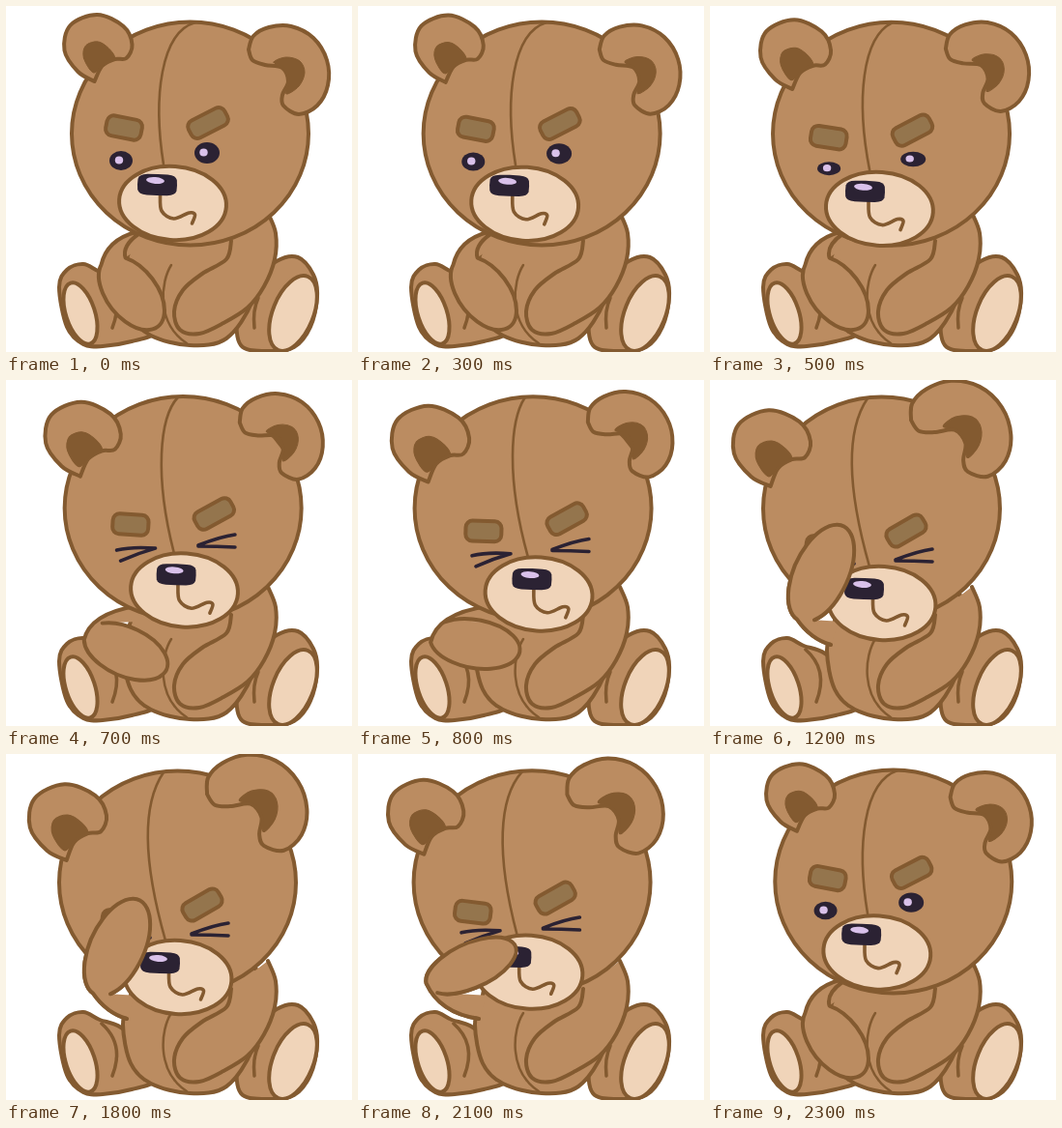
Recreate the animation shown at these times as an HTML page. Size 358 px wide and 358 px high, loop 2.4 s.

```html
<!DOCTYPE html>
<html lang="en">
<head>
<meta charset="utf-8">
<title>Bear facepalm</title>
<style>
  html, body { margin: 0; width: 100%; height: 100%; overflow: hidden; background: #fff; }
  svg { display: block; width: 100vw; height: 100vh; }
</style>
</head>
<body>
<svg id="stage" viewBox="0 0 358 358" stroke-linecap="round" stroke-linejoin="round"></svg>
<script>
const LOOP = 2400, STEP = 100;
const FUR = '#bb8c61', LINE = '#835a30', CREAM = '#f0d4b9', BROW = '#94754d', INK = '#2b2233', SHINE = '#d9c1ea';
const stage = document.getElementById('stage');

const clamp = x => Math.max(0, Math.min(1, x));
const ramp = (t, from, to) => clamp((t - from) / (to - from));
const ease = (t, from, to) => { const x = ramp(t, from, to); return x * x * (3 - 2 * x); };
const mix = (a, b, k) => a.map((v, i) => v + (b[i] - v) * k);

function add(tag, attrs, parent = stage) {
  const el = document.createElementNS('http://www.w3.org/2000/svg', tag);
  set(el, attrs);
  return parent.appendChild(el);
}
function set(el, attrs) {
  for (const k in attrs) el.setAttribute(k, attrs[k]);
}
const place = (el, [x, y], deg = 0, size = 1) =>
  set(el, { transform: `translate(${x} ${y}) rotate(${deg}) scale(${size})` });
const show = (el, on) => set(el, { visibility: on ? 'visible' : 'hidden' });
const path = (d, fill, stroke = LINE, width = 4, parent) =>
  add('path', { d, fill, stroke, 'stroke-width': width }, parent);
const oval = (rx, ry, fill, stroke = 'none') => add('ellipse', { rx, ry, fill, stroke, 'stroke-width': 4 });

// Smooth curve through "x,y x,y ..."
function curve(text, closed) {
  const p = text.split(' ').map(s => s.split(',').map(Number)), n = p.length;
  const get = i => closed ? p[(i + n) % n] : p[Math.max(0, Math.min(n - 1, i))];
  let d = `M${p[0]}`;
  for (let i = 0; i < (closed ? n : n - 1); i++) {
    const [a, b, c, e] = [get(i - 1), get(i), get(i + 1), get(i + 2)];
    d += `C${b.map((v, k) => v + (c[k] - a[k]) / 6)} ${c.map((v, k) => v - (e[k] - b[k]) / 6)} ${c}`;
  }
  return closed ? d + 'Z' : d;
}

// Legs, body and resting arm
path(curve('55,291 63,273 80,267 97,275 119,283 150,310 155,337 130,347 100,352 80,350 63,332', true), FUR);
place(oval(15, 33, CREAM, LINE), [77, 318], -18);
path('M99 279Q123 300 110 333', 'none', LINE, 3.5);
path(curve('240,320 258,285 280,264 302,260 318,278 322,300 315,332 298,353 268,357 243,351', true), FUR);
place(oval(21, 41, CREAM, LINE), [297, 318], 22);
path('M261 302Q255 315 257 333', 'none', LINE, 3.5);
path(curve('139,234 128,253 121,280 129,320 150,341 190,351 228,344 255,305 264,255 258,222 200,210', true), FUR);
path('M171 268C160 285 155 328 187 349', 'none', LINE, 2.5);
path(curve('233,243 228,262 203,277 183,294 174,316 180,335 200,339 225,328 250,312 267,290 278,262 279,235 271,214'), FUR);

// Moving parts, back to front
const sleeve = path('', FUR, 'none'), armBack = path('', 'none');
const head = oval(122.5, 115.5, FUR, LINE);
const seam = path('', 'none', LINE, 2.6);

function ear(outline, hole) {
  const g = add('g', { 'stroke-width': 4 });
  const rim = curve(outline);
  path(rim, FUR, 'none', 0, g);
  path(curve(hole, true), LINE, LINE, 1, g);
  add('path', { d: rim, fill: 'none', stroke: LINE }, g);
  return g;
}
const earL = ear('-4,34 -21,24 -35,2 -29,-24 -1,-35 26,-23 35,-4 29,10 17,11 4,18 -4,34',
  '-15,10 -13,-3 0,-7 12,1 17,11 5,16 -5,25');
const earR = ear('-41,-21 -36,-35 -20,-44 3,-45 26,-33 40,-10 41,16 30,37 11,46 -5,37 -6,26 0,12 -6,-2 -24,-5 -37,-10 -41,-21',
  '-15,-8 -2,-13 12,-9 17,3 11,17 -2,25 0,12 -6,-2');

const brow = (w, h) => add('rect', {
  x: -w / 2, y: -h / 2, width: w, height: h, rx: 7, fill: BROW, stroke: LINE, 'stroke-width': 4
});
const browL = brow(37, 21), browR = brow(42, 20);

function eye(rx, ry, shineX, wink) {
  const ball = oval(rx, ry, INK), shine = oval(4.2, 4, SHINE), lid = path(wink, 'none', INK, 3.6);
  return ([x, y], open) => {
    for (const el of [ball, shine]) show(el, open > 0);
    show(lid, open === 0);
    place(ball, [x, y]);
    place(lid, [x, y]);
    place(shine, [x + shineX, y - .5]);
    set(ball, { ry: ry * open });
    set(shine, { ry: 4 * clamp(open + .2) });
  };
}
const eyeL = eye(12, 10, -2, 'M-20 -4Q-4 -8 20 -6Q2 -1 -16 7');
const eyeR = eye(13, 11, -3.5, 'M19 -7Q4 -5 -19 4M-19 5Q0 5 19 6');

const muzzle = oval(55.5, 38, CREAM, LINE);
const mouth = path(curve('3,10 4.5,27 17,35 33,29 39,31 36,40'), 'none', LINE, 3.6);
// Nose: a superellipse
const nosePoint = (_, i) => {
  const a = i * Math.PI / 12, bulge = v => Math.sign(v) * Math.sqrt(Math.abs(v));
  return [20.5 * bulge(Math.cos(a)), 11 * bulge(Math.sin(a))].map(v => v.toFixed(2)).join();
};
const nose = path(`M${Array.from({ length: 24 }, nosePoint).join('L')}Z`, INK, 'none');
const noseShine = oval(9.5, 3.4, SHINE);
const armFront = path('', FUR);

// Forearm ellipse [x, y, angle, rx, ry]: on the belly, lifted, at the nose, on the face
const ARM = [[130, 297, 52, 44, 26], [121, 273, 10, 47, 25], [117, 219, -24, 50, 23], [115, 200, -65, 54, 28]];

function drawArm(t) {
  const reach = ramp(t, 500, 800) + ramp(t, 800, 1000) + ramp(t, 1000, 1200) - 3 * ramp(t, 2000, 2300);
  const i = Math.min(2, Math.floor(reach));
  const [x, y, deg, rx, ry] = mix(ARM[i], ARM[i + 1], reach - i);
  const rub = t > 1400 && t < 2000 ? Math.sin((t - 1400) / 200 * Math.PI) : 0;
  const rim = a => {
    const r = deg * Math.PI / 180, u = rx * Math.cos(a * Math.PI / 180), v = ry * Math.sin(a * Math.PI / 180);
    return [x + rub + u * Math.cos(r) - v * Math.sin(r), y + rub + u * Math.sin(r) + v * Math.cos(r)];
  };
  const raised = reach > 1.3;
  const [from, to] = raised ? [rim(185), rim(150)] : [rim(165), rim(222)];
  const start = raised ? `M125 274Q${from[0] + 14} 268` : `M134 234Q${from[0] + 6} 242`;
  const outline = `${start} ${from}A${rx} ${ry} ${deg} 1 ${raised ? 1 : 0} ${to}`;
  const fold = clamp(1 - 2 * reach);
  set(sleeve, { d: `${outline}L138 250L138 236Z` });
  set(armBack, { d: `${outline}Q${mix(to, [120, 248], fold)} ${mix(to, [137, 236], fold)}` });
  set(armFront, { d: outline });
  show(armFront, raised);
}

function render(t) {
  // The head bows and, on the way down, swings to the side.
  const bow = ease(t, 200, 1200) - ease(t, 2000, 2350);
  const swing = ease(t, 400, 800) - ease(t, 800, 1200);
  const at = (x, y, bx, by, sx = 0, sy = 0) => [x + bow * bx + swing * sx, y + bow * by + swing * sy];

  drawArm(t);
  place(head, at(190.5, 132, -13, 1, -1));
  set(seam, {
    d: `M${at(196, 17, -33, 2, -2)}C${at(160, 27, -18, 23, 9)} ${at(152, 95, -12, 10, 9)} ${at(163, 164, 2, 29, 11.5)}`
  });

  const sizeL = 1 + .14 * bow + .05 * swing, sizeR = 1 + .16 * bow - .1 * swing;
  place(earL, at(95.5, 44, -31, 27, 0, 5), -4 * bow, sizeL);
  place(earR, at(292, 66, -31.5, -14, 10.5), -16 * bow, sizeR);
  set(earL, { 'stroke-width': 4 / sizeL });
  set(earR, { 'stroke-width': 4 / sizeR });

  place(browL, at(122, 126, -4, 47, 10.5), 11 - 5 * bow - 6 * swing);
  place(browR, at(209, 121, -6, 35, 11), -27 - 3 * bow);
  const open = bow > .45 ? 0 : 1 - 1.4 * bow;
  eyeL(at(119, 160, 10, 36, 12.5, 2.5), open);
  eyeR(at(208, 152, 3, 30, 10), open);

  place(muzzle, at(172.5, 204, 5.5, 27, 11), 4);
  place(mouth, at(156.5, 185, 9, 29, 16.5, 2));
  place(nose, at(156.5, 185, 3, 31, 21.5, 1), 2);
  place(noseShine, at(154.5, 180.5, 3, 31, 21.5, 1), 5);
}

const start = performance.now();
function tick() {
  const t = (performance.now() - start) % LOOP;
  render(Math.floor(t / STEP) * STEP);
  requestAnimationFrame(tick);
}
tick();
</script>
</body>
</html>
```
